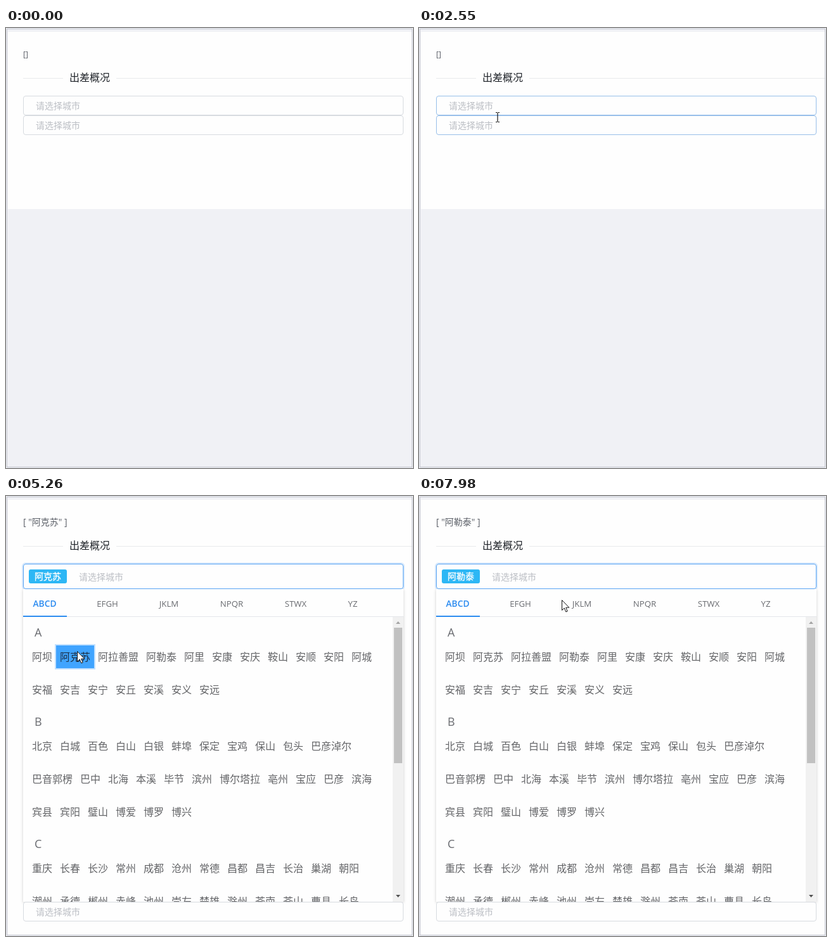
Write an HTML page that moves like this. It is 642 px wide and 695 px high and loops after 8000 ms.

```html
<!DOCTYPE html>
<html lang="zh-CN">
<head>
<meta charset="utf-8">
<style>
html, body { margin: 0; width: 100%; height: 100%; overflow: hidden; background: #f0f1f5; }
svg { display: block; width: 642px; height: 695px; }
text { font-family: "Open Sans", "Noto Sans CJK SC", "Noto Sans CJK", sans-serif; white-space: pre; }
.cn { font-family: "Noto Sans CJK SC", "Noto Sans CJK", sans-serif; font-weight: 350; }
.hint { font-size: 14px; fill: #bbbec4; }
.city { font-size: 16px; fill: #636467; }
.head { font-size: 18px; fill: #6a6c71; }
.tab { font-size: 13.2px; fill: #6a6c71; text-anchor: middle; }
.tab.on { font-size: 13.8px; font-weight: 600; fill: #2d8cf0; }
</style>
</head>
<body>
<svg id="stage" viewBox="0 0 642 695">
  <defs>
    <clipPath id="listClip"><rect x="27" y="44" width="600" height="450"/></clipPath>
    <filter id="shade" x="-5%" y="-5%" width="110%" height="110%">
      <feDropShadow dx="0" dy="1" stdDeviation="2" flood-color="#000" flood-opacity=".2"/>
    </filter>
  </defs>
  <rect width="642" height="695" fill="#f0f1f5"/>
  <rect id="card" x="3" y="6" width="638" height="280" fill="#fefefe"/>
  <text id="model" x="27" y="46" fill="#5c6068"></text>
  <path d="M27 79.5H90M174 79.5H642" stroke="#e8eaec"/>
  <text class="cn" x="100" y="84" font-size="16" fill="#1f2329">出差概况</text>
  <rect id="glow" x="26" y="106" width="602" height="33" rx="5" fill="none" stroke="#2d8cf0" stroke-opacity=".18" stroke-width="2"/>
  <g id="panel"></g>
  <g id="second">
    <rect id="box2" x="27.5" y=".5" width="599" height="30" rx="3.5" fill="#fefefe"/>
    <text class="cn hint" x="47" y="21">请选择城市</text>
  </g>
  <rect id="box1" x="27.5" y="107.5" width="599" height="30" rx="3.5" fill="#fefefe"/>
  <g id="tag">
    <rect id="tagBox" x="36" y="116" height="22" rx="3" fill="#2db7f5"/>
    <text id="tagText" class="cn" x="45" y="132" font-size="14" fill="#fff" stroke="#fff" stroke-width=".35"></text>
  </g>
  <text id="hint1" class="cn hint">请选择城市</text>
  <path id="caret" d="M47.5 114V132" stroke="#333"/>
  <rect x="1.5" y="1.5" width="639" height="692" fill="none" stroke="#c4c6d0"/>
  <path id="arrow" d="M.5 .5V16.5L4.2 13L6.8 19L9.2 18L6.7 12.2H11.8Z" fill="#fff" stroke="#111" stroke-linejoin="round"/>
  <path id="beam" d="M-3 -7.5H-.5M.5 -7.5H3M-3 7.5H-.5M.5 7.5H3M0 -7V7" fill="none" stroke="#111" stroke-width="1.2"/>
</svg>
<script>
const LOOP = 8000, OPEN = 3100;
const $ = id => document.getElementById(id);
const add = (parent, tag, attrs, text) => {
  const el = document.createElementNS('http://www.w3.org/2000/svg', tag);
  for (const k in attrs) el.setAttribute(k, attrs[k]);
  if (text) el.textContent = text;
  return parent.appendChild(el);
};
const set = (id, attrs) => { for (const k in attrs) $(id).setAttribute(k, attrs[k]); };
const show = (id, on) => set(id, { visibility: on ? 'visible' : 'hidden' });
const clamp = v => Math.max(0, Math.min(1, v));
const ease = v => v * v * (3 - 2 * v);

// Panel coordinates start at the bottom edge of the first input.
const groups = [
  ['A', 68, ['阿坝 阿克苏 阿拉善盟 阿勒泰 阿里 安康 安庆 鞍山 安顺 安阳 阿城', '安福 安吉 安宁 安丘 安溪 安义 安远']],
  ['B', 209, ['北京 白城 百色 白山 白银 蚌埠 保定 宝鸡 保山 包头 巴彦淖尔',
    '巴音郭楞 巴中 北海 本溪 毕节 滨州 博尔塔拉 亳州 宝应 巴彦 滨海', '宾县 宾阳 璧山 博爱 博罗 博兴']],
  ['C', 402, ['重庆 长春 长沙 常州 成都 沧州 常德 昌都 昌吉 长治 巢湖 朝阳', '潮州 承德 郴州 赤峰 池州 崇左 楚雄 滁州 苍南 苍山 曹县 长岛']]
];
// City, hover start, hover end, click time
const picks = [
  ['阿克苏', 4670, 5360, 4920],
  ['阿拉善盟', 5380, 6720, 5950],
  ['阿勒泰', 6740, 7560, 7110]
];
const marks = {}, cities = {};

function buildPanel() {
  const panel = $('panel');
  add(panel, 'rect', { x: 27, y: 0, width: 600, height: 494, fill: '#fefefe', filter: 'url(#shade)' });
  [['ABCD', 61], ['EFGH', 160], ['JKLM', 257], ['NPQR', 356], ['STWX', 457], ['YZ', 547]].forEach(([name, x], i) =>
    add(panel, 'text', { class: i ? 'tab' : 'tab on', x, y: 28 }, name));
  add(panel, 'path', { d: 'M27 43.5H627', stroke: '#e4e6ea' });
  add(panel, 'rect', { x: 27, y: 42, width: 69, height: 2, fill: '#2d8cf0' });
  const list = add(panel, 'g', { 'clip-path': 'url(#listClip)' });
  for (const [letter, mid, rows] of groups) {
    add(list, 'text', { class: 'head', x: 45, y: mid + 6.5 }, letter);
    rows.forEach((row, r) => {
      const y = mid + 39 + r * 52;
      let x = 41;
      for (const name of row.split(' ')) {
        const w = name.length * 16;
        if (picks.some(p => p[0] === name))
          marks[name] = add(list, 'rect', { x: x - 7, y: y - 19, width: w + 14, height: 38, fill: '#40a4ff', stroke: '#c3e1ff', 'stroke-width': 2, opacity: 0 });
        cities[name] = add(list, 'text', { class: 'cn city', x, y: y + 6 }, name);
        x += w + 12;
      }
    });
  }
  add(panel, 'rect', { x: 610, y: 44, width: 17, height: 450, fill: '#f1f1f1' });
  add(panel, 'rect', { x: 612, y: 61, width: 13, height: 214, fill: '#c1c1c1' });
  add(panel, 'path', { d: 'M615 55H622L618.5 51Z', fill: '#a3a3a3' });
  add(panel, 'path', { d: 'M615 483H622L618.5 487Z', fill: '#505050' });
}

// Pointer: time, x, y
const path = [
  [170, 70, 690], [560, 95, 480], [820, 112, 365], [950, 113, 381],
  [1180, 124, 270], [1400, 134, 183], [1600, 133, 176], [1770, 131, 164],
  [2100, 128, 158], [2420, 125, 144], [2900, 121, 132], [3890, 121, 132],
  [4300, 115, 185], [4650, 111, 232], [4740, 110, 245], [5250, 110, 245],
  [5600, 159, 252], [6260, 159, 252], [6700, 212, 256], [7000, 224, 254],
  [7450, 224, 254], [7780, 226, 149], [7960, 225, 164]
];
function pointer(t) {
  const i = path.findIndex(p => p[0] > t);
  if (i < 0) return path[path.length - 1].slice(1);
  const [t0, x0, y0] = path[Math.max(0, i - 1)], [t1, x1, y1] = path[i];
  const k = t1 > t0 ? (t - t0) / (t1 - t0) : 0;
  return [x0 + (x1 - x0) * k, y0 + (y1 - y0) * k];
}

const pulse = (t, on, off, d) => ease(clamp((t - on) / d)) - ease(clamp((t - off) / d));
const blend = (from, to, k) => `rgb(${from.map((a, i) => Math.round(a + (to[i] - a) * k))})`;
const border = k => blend([215, 219, 224], [87, 163, 243], k);

function draw(t) {
  const open = t >= OPEN;
  const pick = picks.filter(p => t >= p[3]).pop();
  const name = pick ? pick[0] : '';
  const grow = pick ? 9 : 0;
  const tagW = name.length * 14 + 18;
  const bottom = 138 + grow;

  set('card', { height: open ? Math.min(681 + grow, 687) : 280 });
  set('model', { 'font-size': pick ? 14 : 12 });
  $('model').textContent = pick ? `[ "${name}" ]` : '[]';

  const drop = ease(clamp((t - OPEN) / 300));
  show('panel', open);
  set('panel', { transform: `translate(0 ${bottom}) scale(1 ${0.8 + 0.2 * drop})`, opacity: drop });
  set('second', { transform: `translate(0 ${open ? bottom + 494 : 138})` });
  set('box2', { stroke: border(pulse(t, 1700, 2450, 200)) });
  set('box1', { height: 30 + grow, stroke: border(pulse(t, 2450, LOOP * 2, 200)) });
  set('glow', { height: 33 + grow, opacity: clamp((t - OPEN) / 200) });

  show('tag', pick);
  set('tagBox', { width: tagW });
  $('tagText').textContent = name;
  set('hint1', { x: pick ? 55 + tagW : 47, y: pick ? 133 : 128 });
  show('caret', open && !pick && Math.floor((t - OPEN) / 500) % 2 === 0);

  for (const [city, on, off] of picks) {
    const k = pulse(t, on, off, 90);
    marks[city].setAttribute('opacity', k);
    cities[city].style.fill = blend([99, 100, 103], [28, 48, 70], k);
  }

  const [x, y] = pointer(t);
  const overInput = y < (open ? 138 : 169) && t < 4500;
  const seen = t >= 170;
  show('arrow', seen && !overInput);
  show('beam', seen && overInput);
  const at = { transform: `translate(${Math.round(x)} ${Math.round(y)})` };
  set('arrow', at);
  set('beam', at);
}

buildPanel();
const start = performance.now();
function tick() {
  draw((performance.now() - start) % LOOP);
  requestAnimationFrame(tick);
}
tick();
</script>
</body>
</html>
```
